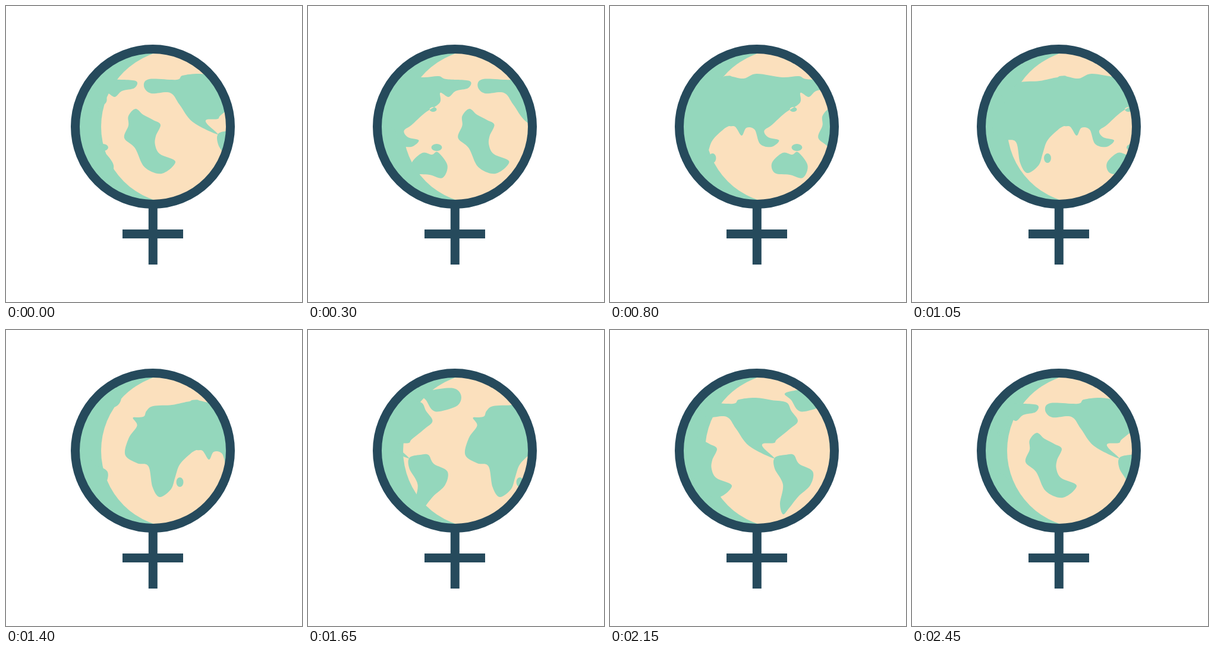
Write an HTML page that moves like this. It is 498 by 498 pixels and loops after 2.5 s.

```html
<!DOCTYPE html>
<html lang="en">
<head>
<meta charset="utf-8">
<title>Turning globe</title>
<style>
  html, body { margin: 0; width: 100%; height: 100%; overflow: hidden; background: #fff; }
  svg { display: block; width: 498px; height: 498px; }
</style>
</head>
<body>
<svg viewBox="0 0 498 498">
  <defs>
    <clipPath id="disc"><circle cx="247" cy="203" r="126"/></clipPath>
  </defs>
  <g clip-path="url(#disc)">
    <circle cx="247" cy="203" r="126" fill="#94d7bc"/>
    <circle cx="290" cy="203" r="130" fill="#fbe0bd"/>
    <path id="land" fill="#94d7bc"/>
  </g>
  <g fill="none" stroke="#264a5c" stroke-width="15">
    <circle cx="247" cy="203" r="130.5"/>
    <path d="M247.3 338V435M196 383.5H298"/>
  </g>
</svg>
<script>
const LOOP = 2500, STEP = 50, WIDTH = 522;

// Key points of each coast on the flat map.
const coasts = {
  pacific: '206,185 218,173 231,183 248,192 260,200 252,219 251,234 259,249 285,262 262,282 233,271 217,239 199,222 206,201',
  northAmerica: '232,135 241,123 287,124 297,117 325,114 352,118 377,122 385,136 396,153 383,166 361,184 356,190 338,191 338,198 356,216 314,195 292,166 276,146 244,147',
  southAmerica: '357,215 375,210 389,210 398,225 421,238 417,261 397,280 381,300 371,310 366,292 371,260 357,233',
  greenland: '374,107 396,101 431,98 444,110 438,127 408,137 395,134 385,118',
  africa: '-58,148 -48,147 -39,145 -35,136 -24,128 8,126 38,120 55,121 63,165 53,197 40,207 21,226 13,248 6,268 -13,281 -25,264 -32,229 -51,224 -71,210 -65,182 -51,161',
  asia: '38,120 73,122 95,114 138,120 166,118 179,123 218,126 216,138 195,143 183,153 169,146 168,163 143,180 121,200 108,210 115,221 133,226 120,237 101,232 92,208 78,205 70,218 59,203 45,199 33,165',
  australia: '121,264 139,247 155,250 165,246 181,268 173,289 151,284 126,281'
};

// Small islands: centre and radii.
const islands = [[163, 238, 9, 6], [21, 256, 6, 8], [157, 174, 6, 4]];

// Smooth closed curve through the points.
function curve(text) {
  const pts = text.split(' ').map(p => p.split(',').map(Number));
  const at = i => pts[(i + pts.length) % pts.length];
  const handle = (p, from, to) => p.map((v, k) => v + (to[k] - from[k]) / 6);
  return `M${pts[0]}` + pts.map((p, i) => {
    const next = at(i + 1);
    return `C${handle(p, at(i - 1), next)} ${handle(next, at(i + 2), p)} ${next}`;
  }).join('') + 'Z';
}

const oval = ([x, y, rx, ry]) =>
  `M${x - rx},${y}a${rx},${ry} 0 1 0 ${2 * rx},0a${rx},${ry} 0 1 0 ${-2 * rx},0Z`;

const land = document.getElementById('land');
land.setAttribute('d', Object.values(coasts).map(curve).concat(islands.map(oval)).join(''));

// The map repeats to the left and right.
const copies = [-WIDTH, WIDTH].map(shift => {
  const copy = land.cloneNode();
  copy.removeAttribute('id');
  land.after(copy);
  return [copy, shift];
});
const maps = [[land, 0], ...copies];

// The spin is slightly uneven: [time, distance].
const spin = [[0, 0], [600, 107], [1050, 207], [1400, 271.5], [1650, 335.5],
              [2150, 442], [2450, 514], [LOOP, WIDTH]];

function distance(t) {
  const i = spin.findIndex(key => key[0] > t);
  const [t0, d0] = spin[i - 1], [t1, d1] = spin[i];
  return d0 + (d1 - d0) * (t - t0) / (t1 - t0);
}

function draw(ms) {
  const d = distance(Math.floor((ms % LOOP) / STEP) * STEP);
  for (const [map, shift] of maps) map.setAttribute('transform', `translate(${d + shift} 0)`);
}

const start = performance.now();
function tick() {
  draw(performance.now() - start);
  requestAnimationFrame(tick);
}
tick();
</script>
</body>
</html>
```
